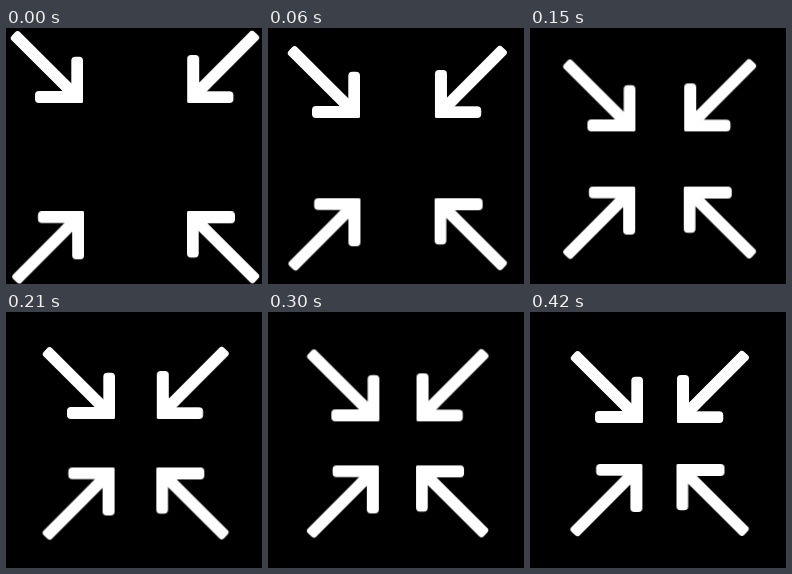
These frames come from a looping animation (256 px wide and 256 px high, 450 ms). An HTML page:

```html
<!DOCTYPE html>
<html lang="en">
<head>
<meta charset="utf-8">
<title>Converging arrows</title>
<style>
  html, body { margin: 0; width: 100%; height: 100%; overflow: hidden; background: #000; }
  svg { display: block; width: 100vw; height: 100vh; fill: #fff; }

  /* --x and --y: outward direction and reach of each arrow */
  .arrow { animation: converge 450ms infinite; }
  .nw { --x: -1px;   --y: -1px; }
  .ne { --x: .95px;  --y: -1px; }
  .se { --x: .96px;  --y: .87px; }
  .sw { --x: -.95px; --y: .87px; }

  /* A decelerating move, advancing once every 30 ms */
  @keyframes converge {
    0%       { transform: translate(calc(var(--x) * 36), calc(var(--y) * 36)); animation-timing-function: steps(2); }
    13.3333% { transform: translate(calc(var(--x) * 21), calc(var(--y) * 21)); animation-timing-function: steps(1); }
    20%      { transform: translate(calc(var(--x) * 15.2), calc(var(--y) * 15.2)); animation-timing-function: steps(1); }
    26.6667% { transform: translate(calc(var(--x) * 10.8), calc(var(--y) * 10.8)); animation-timing-function: steps(1); }
    33.3333% { transform: translate(calc(var(--x) * 7.6), calc(var(--y) * 7.6)); animation-timing-function: steps(2); }
    46.6667% { transform: translate(calc(var(--x) * 4), calc(var(--y) * 4)); animation-timing-function: steps(2); }
    60%      { transform: translate(calc(var(--x) * 2.2), calc(var(--y) * 2.2)); animation-timing-function: steps(3); }
    80%      { transform: translate(calc(var(--x) * .5), calc(var(--y) * .5)); animation-timing-function: steps(2); }
    93.3333%, 100% { transform: translate(0px, 0px); }
  }
</style>
</head>
<body>
<svg viewBox="0 0 256 256">
  <defs>
    <!-- Arrow with its tip at the origin, pointing down and right -->
    <g id="arrow">
      <path d="M-44-12H-11.7V-42.2a4 4 0 0 1 4-4H-4a4 4 0 0 1 4 4V-1.5a1.5 1.5 0 0 1-1.5 1.5H-44a4 4 0 0 1-4-4V-8a4 4 0 0 1 4-4z"/>
      <rect y="-5.8" width="88" height="11.6" rx="3.5" transform="translate(-69.5 -69) rotate(44.8)"/>
    </g>
  </defs>
  <g class="arrow nw"><use href="#arrow" transform="translate(113 111)"/></g>
  <g class="arrow ne"><use href="#arrow" transform="translate(147 111) rotate(90)"/></g>
  <g class="arrow se"><use href="#arrow" transform="translate(146.5 152) rotate(180)"/></g>
  <g class="arrow sw"><use href="#arrow" transform="translate(112.4 152) rotate(-90)"/></g>
</svg>
</body>
</html>
```
